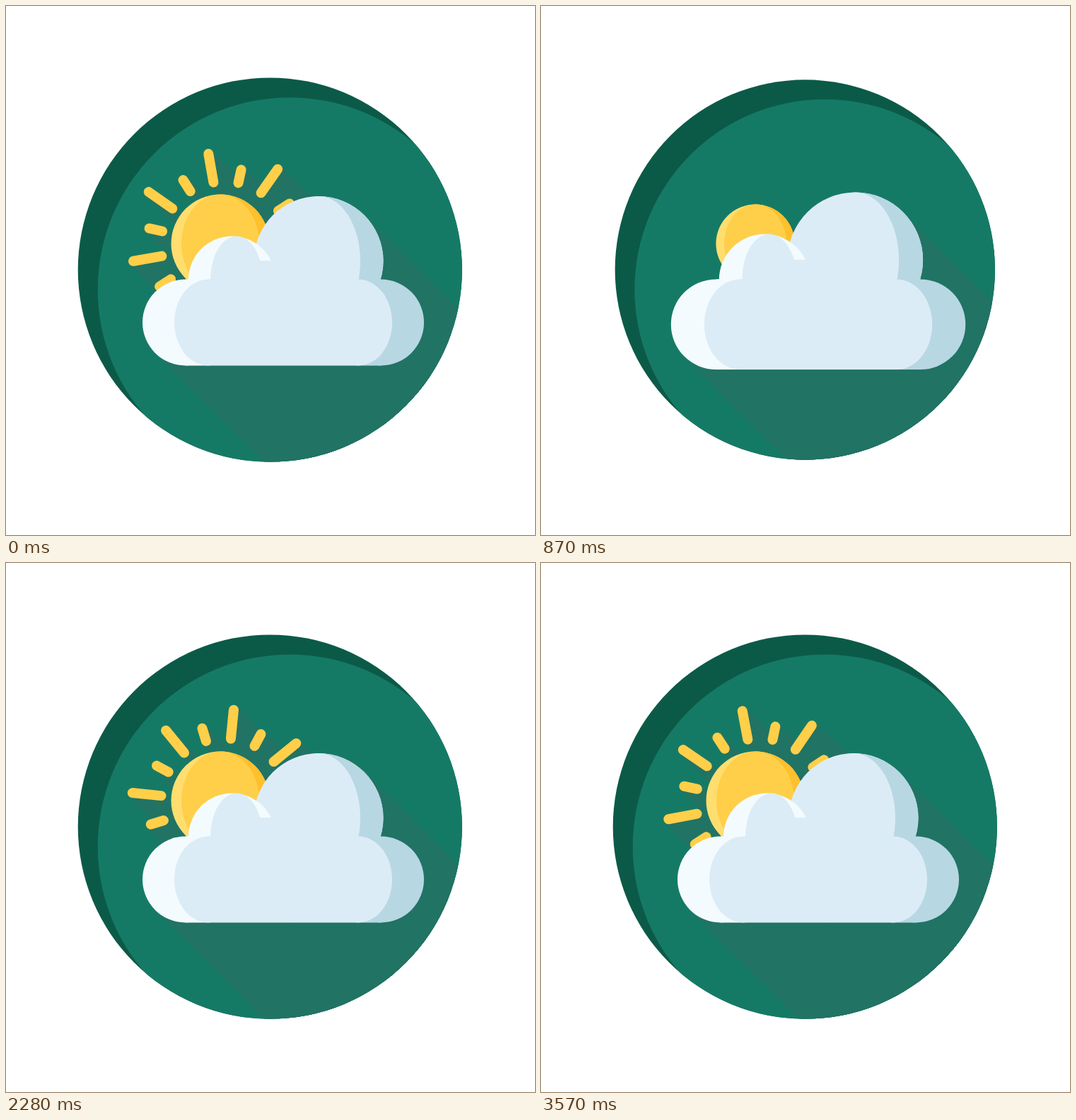
These frames come from a looping animation (748x748 px, 3600 ms). An HTML page with a canvas:

```html
<!DOCTYPE html>
<html>
<head>
<meta charset="utf-8">
<style>
  html, body { margin: 0; height: 100%; overflow: hidden; background: #fff; }
  canvas { display: block; }
</style>
</head>
<body>
<canvas id="stage" width="748" height="748"></canvas>
<script>
const ctx = document.getElementById('stage').getContext('2d');
const LOOP = 3600, STEP = 30, RISE = 0.3;
const DARK = '#0b5a48', GREEN = '#157a65', SHADOW = '#217364';
const MIST = '#dcecf6', WHITE = '#f3fbff', HAZE = '#b7d7e3';
const GOLD = '#ffcf49', PALE = '#ffde6f', AMBER = '#fec02c';

const disk = { x: 373.3, y: 373, r: 271.6 };
const sun = { x: 303, y: 336, r: 69.5 };
const rays = { x: 309, y: 338 };
const cloud = { x: 391.5, y: 389 };
const puffs = [[442, 360.5, 91.5], [319.5, 387, 61.5], [254, 447.5, 61], [530, 447.5, 61]];

// Linear growth followed by a damped overshoot.
function pop(t, start) {
  const u = t - start;
  if (u < RISE) return Math.max(0, u / RISE);
  const v = u - RISE;
  return 1 + 0.245 * Math.exp(-5.3 * v) * Math.sin(10 * v);
}

function scaled(origin, s, draw) {
  if (s <= 0) return;
  ctx.save();
  ctx.translate(origin.x, origin.y);
  ctx.scale(s, s);
  ctx.translate(-origin.x, -origin.y);
  draw(s);
  ctx.restore();
}

function ellipse(color, x, y, rx, ry = rx, from = 0, to = 2 * Math.PI) {
  ctx.fillStyle = color;
  ctx.beginPath();
  ctx.ellipse(x, y, rx, ry, 0, from, to);
  ctx.fill();
}

function rect(color, x, y, w, h) {
  ctx.fillStyle = color;
  ctx.fillRect(x, y, w, h);
}

// Sweeps a round-ended segment diagonally down to the right.
function sweep(x1, y1, x2, y2, width, reach) {
  ctx.fillStyle = ctx.strokeStyle = SHADOW;
  ctx.lineWidth = width;
  ctx.lineJoin = 'round';
  ctx.beginPath();
  ctx.moveTo(x1, y1);
  ctx.lineTo(x2, y2);
  ctx.lineTo(x2 + reach, y2 + reach);
  ctx.lineTo(x1 + reach, y1 + reach);
  ctx.closePath();
  ctx.fill();
  ctx.stroke();
}

function eachRay(turn, draw) {
  for (let i = 0; i < 16; i++) {
    const a = (turn - 100 + i * 22.5) * Math.PI / 180;
    const c = Math.cos(a), s = Math.sin(a), outer = i % 2 ? 109 : 131;
    draw(rays.x + 90 * c, rays.y + 90 * s, rays.x + outer * c, rays.y + outer * s);
  }
}

function drawDisk() {
  const { x, y, r } = disk;
  ellipse(DARK, x, y, r);
  ctx.save();
  ctx.clip();
  ellipse(GREEN, x + 28, y + 28, r);
  ctx.restore();
}

function drawSun() {
  const { x, y, r } = sun;
  ellipse(PALE, x, y, r);
  ellipse(AMBER, x, y, r, r, -Math.PI / 2, Math.PI / 2);
  ellipse(GOLD, x, y, 55, r);
}

function drawRays(turn) {
  ctx.strokeStyle = GOLD;
  ctx.lineWidth = 14;
  ctx.lineCap = 'round';
  eachRay(turn, (x1, y1, x2, y2) => {
    ctx.beginPath();
    ctx.moveTo(x1, y1);
    ctx.lineTo(x2, y2);
    ctx.stroke();
  });
}

function drawCloud() {
  const [big, small, left, right] = puffs;
  ellipse(MIST, ...big);
  ellipse(HAZE, big[0], big[1], big[2], big[2], -Math.PI / 2, Math.PI / 2);
  ellipse(MIST, big[0], big[1], 59, big[2]);
  ellipse(WHITE, ...small);
  ellipse(MIST, 326, small[1], 37, small[2]);
  rect(MIST, 326, 360, 80, 60);
  ellipse(WHITE, ...left);
  rect(WHITE, 254, 386.5, 32, 122);
  ellipse(HAZE, ...right);
  rect(HAZE, 498, 386.5, 32, 122);
  ellipse(MIST, 286, 447.5, 48, 61);
  ellipse(MIST, 498, 447.5, 48, 61);
  rect(MIST, 286, 386.5, 212, 122);
}

function drawShadows(size, turn) {
  ctx.save();
  scaled(disk, size.disk, () => {
    ctx.beginPath();
    ctx.arc(disk.x, disk.y, disk.r, 0, 2 * Math.PI);
  });
  ctx.clip();
  scaled(rays, size.rays, s =>
    eachRay(turn, (...line) => sweep(...line, 14, 800 / s)));
  scaled(sun, size.sun, s =>
    sweep(sun.x, sun.y, sun.x, sun.y, 2 * sun.r, 800 / s));
  scaled(cloud, size.cloud, s => {
    for (const [x, y, r] of puffs) sweep(x, y, x, y, 2 * r, 800 / s);
    sweep(254, 447.5, 530, 447.5, 122, 800 / s);
  });
  ctx.restore();
}

function render(now) {
  // The settled pose opens the loop, then everything pops in again.
  const ms = Math.floor((now % LOOP) / STEP) * STEP || LOOP;
  const t = ms / 1000;
  const turn = ms / 45 - 35;
  const size = {
    disk: pop(t, 0.03), cloud: pop(t, 0.33), sun: pop(t, 0.63), rays: pop(t, 0.93)
  };
  ctx.clearRect(0, 0, 748, 748);
  scaled(disk, size.disk, drawDisk);
  if (size.disk > 0) drawShadows(size, turn);
  scaled(rays, size.rays, () => drawRays(turn));
  scaled(sun, size.sun, drawSun);
  scaled(cloud, size.cloud, drawCloud);
}

const begin = performance.now();
function tick() {
  render(performance.now() - begin);
  requestAnimationFrame(tick);
}
tick();
</script>
</body>
</html>
```
